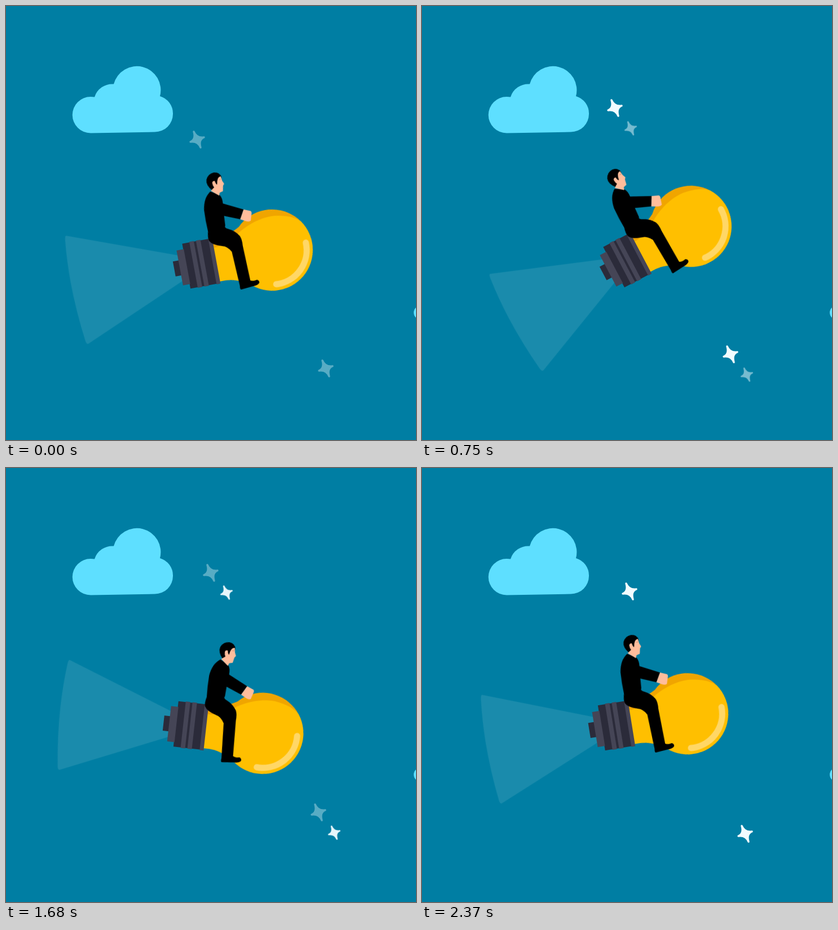
These frames come from a looping animation (727x770 px, 2.4 s). An HTML page without scripts:

```html
<!DOCTYPE html>
<html lang="en">
<head>
<meta charset="utf-8">
<title>Bulb rider</title>
<style>
html, body { margin: 0; width: 100%; height: 100%; overflow: hidden; background: #007ea3; }
svg { display: block; width: 100%; height: 100%; }

.rider {
  transform-origin: 336px 395.5px;
  animation: rock 1200ms cubic-bezier(.36, .18, .64, .82) -590ms infinite alternate;
}
@keyframes rock {
  from { transform: rotate(9.1deg); }
  to { transform: rotate(-30.8deg); }
}

.sparkles { fill: #f2fcff; stroke: #f2fcff; stroke-width: 3.4; stroke-linecap: round; stroke-linejoin: round; }
.sparkles g { opacity: 0; animation: 2400ms linear calc(var(--at) * 1ms - 2400ms) infinite; }
.sparkles .long { animation-name: long; }
.sparkles .short { animation-name: short; }
.sparkles .last { animation-name: last; }
@keyframes long { 0%, 22.1%, 100% { opacity: 0; } 3.3%, 17.5% { opacity: 1; } }
@keyframes short { 0%, 10.8%, 100% { opacity: 0; } 3.3%, 6.7% { opacity: 1; } }
@keyframes last { 0%, 93% { opacity: 0; } 97%, 100% { opacity: 1; } }

.cloud { fill: #5edfff; }
.dark { fill: #2b2b3a; }
.metal { fill: #454556; }
.skin { fill: #ffbd9b; }
</style>
</head>
<body>
<svg viewBox="0 0 727 770">
  <defs>
    <path id="star" d="M-6-14Q-1-2 12-4Q2 0 6 14Q1 2-12 4Q-2 0-6-14Z"/>
    <use id="small" href="#star" transform="scale(.8)"/>
  </defs>

  <rect width="727" height="770" fill="#007ea3"/>
  <g class="cloud">
    <path d="M150 225.5A32 32 0 0 1 150 161L157 161.500A33 33 0 0 1 191 138.500A42 42 0 0 1 273 160A32 32 0 0 1 296 191.500A32 32 0 0 1 264 223.500Z"/>
    <circle cx="735" cy="544" r="12"/>
  </g>

  <g class="sparkles">
    <g class="long" style="--at:-28"><use href="#star" x="339" y="237"/><use href="#star" x="567" y="643"/></g>
    <g class="short" style="--at:382"><use href="#small" x="374" y="241"/><use href="#small" x="601" y="646"/></g>
    <g class="short" style="--at:540"><use href="#small" x="370" y="217"/><use href="#small" x="576" y="654"/></g>
    <g class="short" style="--at:640"><use href="#star" x="342" y="181"/><use href="#star" x="547" y="618"/></g>
    <g class="long" style="--at:1116"><use href="#star" x="365" y="204"/><use href="#star" x="530" y="650"/></g>
    <g class="short" style="--at:1380"><use href="#small" x="400" y="208"/><use href="#small" x="565" y="654"/></g>
    <g class="short" style="--at:1605"><use href="#small" x="391" y="221"/><use href="#small" x="582" y="647"/></g>
    <g class="short" style="--at:1652"><use href="#star" x="363" y="186"/><use href="#star" x="554" y="611"/></g>
    <g class="last" style="--at:0"><use href="#star" x="368" y="219"/><use href="#star" x="573" y="649"/></g>
  </g>

  <g class="rider">
    <path fill="#fff" opacity=".1" d="M109 366L297 436V482L113 561Q109 563 108 556Q96 460 105 374Q106 364 109 366Z"/>

    <!-- bulb -->
    <path fill="#f0a500" d="M361 419H372Q388 419 412 406A72 72 0 1 1 412 508Q388 495 372 495H361Z"/>
    <path fill="#ffbf00" d="M361 434Q382 436 412 415Q445 396 478 398Q508 402 522 416A72 72 0 0 1 412 508Q388 495 372 495H361Z"/>
    <path fill="none" stroke="#ffd766" stroke-width="11" stroke-linecap="round" d="M524 455A61 61 0 0 1 459 518"/>

    <!-- screw base -->
    <path class="dark" d="M286 445H297V472H286ZM308 417H360V498H308Z"/>
    <path class="metal" d="M296 427H309V490H296ZM321 416H329V499H321ZM333 416H341V499H333ZM355 416H362V499H355Z"/>

    <!-- man -->
    <path class="skin" d="M417 393L426 377L438 382Q440 384 438 389L435 399Q431 401 426 398Z"/>
    <path d="M374 335L389 344Q393 350 392 360L426 377L417 393L390 382L389 399Q386 403 393 406Q404 411 411 422Q414 429 413 440L415 503Q419 506 427 504Q431 506 430 510Q427 514 418 514L396 516Q394 515 395 509L392 447Q386 436 377 434Q360 429 356 421Q354 415 357 404Q356 385 357 366Q360 344 374 335Z"/>
    <path d="M377 333Q368 322 371 313Q376 303 386 303Q397 304 398 314L392 328L384 334Z"/>
    <path class="skin" d="M397 312Q390 311 388 325Q386 325 385 318Q381 317 380 321Q380 326 382 329L375 334L388 345L390 340L396 338.500L398 329L400.500 326L398 320Z"/>
    <path fill="none" stroke="#c98668" stroke-width=".8" d="M393 317.500L397 317"/>
  </g>
</svg>
</body>
</html>
```
